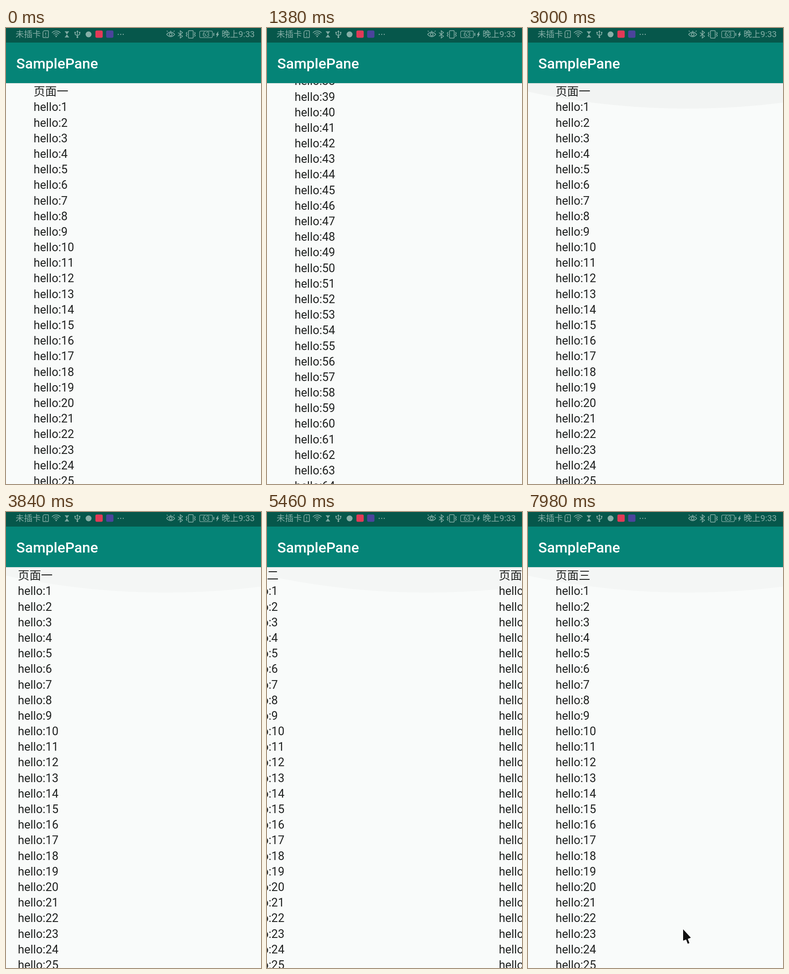
An HTML page with a canvas that plays this animation: 559x1001 px, repeating every 8000 ms.

```html
<!DOCTYPE html>
<html lang="zh">
<head>
<meta charset="utf-8">
<title>Scrolling pages</title>
<style>
html, body { margin: 0; width: 100%; height: 100%; overflow: hidden; background: #f9fbfa; }
body { position: relative; font-family: Roboto, "Noto Sans CJK SC", "Noto Sans CJK", sans-serif; }
#view { position: absolute; left: 0; top: 121px; width: 559px; height: 880px; overflow: hidden; }
.page { position: absolute; left: 60.4px; top: 1.2px; color: #202221; font-size: 25.4px; white-space: nowrap; }
.page div { height: 34.2px; line-height: 34.2px; }
canvas { position: absolute; left: 0; top: 0; width: 559px; height: 1001px; }
.label { position: absolute; white-space: nowrap; color: #86afa7; font-size: 18.5px; line-height: 28px; top: 0; }
#title { left: 22.5px; top: 58px; color: #fff; font-size: 31.8px; line-height: 40px; font-weight: 500; }
#level { left: 424px; width: 29px; font-size: 14px; text-align: center; }
</style>
</head>
<body>
<div id="view"></div>
<canvas id="art"></canvas>
<div class="label" style="left:21px">未插卡</div>
<div class="label" id="level">63</div>
<div class="label" style="left:472.5px">晚上9:33</div>
<div class="label" id="title">SamplePane</div>
<script>
const W = 559, H = 1001, BAR = 121, STATUS = 32, LOOP = 8000, STEP = 60;
const ICON = '#86afa7';
const SCROLL = 1322;   // how far the first list is flung
const GAP = 8.5;       // the second page stops short by this much

// Progress from 0 to 1 with a cubic ease at both ends.
function ease(t, start, length) {
  const p = Math.min(1, Math.max(0, (t - start) / length));
  return p < 0.5 ? 4 * p ** 3 : 1 - 4 * (1 - p) ** 3;
}

const scrollY = t => SCROLL * (ease(t, 360, 960) - ease(t, 1575, 720));
const scrollX = t => (W - GAP) * ease(t, 3720, 480) + (W + GAP) * ease(t, 5280, 480);

const view = document.getElementById('view');
const pages = ['一', '二', '三'].map(name => {
  const page = document.createElement('div');
  page.className = 'page';
  for (let i = 0; i < 100; i++) {
    const row = document.createElement('div');
    row.textContent = i ? 'hello:' + i : '页面' + name;
    page.append(row);
  }
  view.append(page);
  return page;
});

const canvas = document.getElementById('art');
const dpr = window.devicePixelRatio || 1;
canvas.width = W * dpr;
canvas.height = H * dpr;
const c = canvas.getContext('2d');
c.scale(dpr, dpr);

function rect(x, y, w, h, color) {
  c.fillStyle = color;
  c.fillRect(x, y, w, h);
}

function box(x, y, w, h, r, fill) {
  c.beginPath();
  c.roundRect(x, y, w, h, r);
  if (fill) { c.fillStyle = fill; c.fill(); } else c.stroke();
}

function line(points, fill) {
  c.beginPath();
  for (let i = 0; i < points.length; i += 2) c.lineTo(points[i], points[i + 1]);
  if (fill) { c.closePath(); c.fillStyle = fill; c.fill(); } else c.stroke();
}

function disc(x, y, r, color = ICON) {
  c.beginPath();
  c.arc(x, y, r, 0, 7);
  c.fillStyle = color;
  c.fill();
}

// Runs a drawing around a centre on the status bar's middle line.
function icon(x, paint) {
  c.save();
  c.translate(x, 14);
  c.strokeStyle = ICON;
  c.lineWidth = 1.5;
  paint();
  c.restore();
}

const sides = paint => [-1, 1].forEach(paint);

function sim() {
  box(-6, -8, 12, 15, [4, 1, 1, 1]);
  line([0, -4, 0, 1]);
  disc(0, 4, 1);
}

function wifi() {
  for (let r = 4.5; r < 13; r += 4) {
    c.beginPath();
    c.arc(0, 5, r, -Math.PI * 0.77, -Math.PI * 0.23);
    c.stroke();
  }
  disc(0, 4.5, 1.6);
}

function hourglass() {
  sides(s => {
    line([-4.5, 6 * s, 4.5, 6 * s]);
    line([-3.5, 5 * s, 3.5, 5 * s, 0, 0], ICON);
  });
}

function usb() {
  line([0, -6, 0, 6]);
  line([-5, -3, -5, 0, 0, 3, 5, 0, 5, -3]);
  line([-2.5, -5, 0, -9, 2.5, -5], ICON);
  disc(0, 6, 1.9);
  sides(s => disc(5 * s, -4, 1.7));
}

function eye() {
  c.beginPath();
  sides(s => {
    c.moveTo(-9, 0);
    c.quadraticCurveTo(0, 10 * s, 9, 0);
    line.call;
  });
  c.stroke();
  c.beginPath();
  c.arc(0, 0, 3, 0, 7);
  c.stroke();
  for (let k = -1; k <= 1; k++) line([6.5 * k, -6, 8.5 * k, -8]);
}

function bluetooth() {
  line([-5, -4, 5, 4, 0, 8, 0, -8, 5, -4, -5, 4]);
}

function vibration() {
  box(-5, -8.2, 10.4, 16.4, 1.5);
  sides(s => {
    const zigzag = [];
    for (let k = 0; k < 5; k++) zigzag.push(s * (8 + k % 2 * 2), -5 + 2.5 * k);
    line(zigzag);
  });
}

function battery() {
  c.lineWidth = 1.2;
  box(-14, -7.3, 28, 14.5, 2.5);
  rect(16, -3.2, 2, 6.4, ICON);
}

function bolt() {
  sides(s => line([2 * s, -7 * s, -3.5 * s, s, s, s], ICON));
}

function drawBars() {
  rect(0, STATUS, W, BAR - STATUS, '#058477');
  rect(0, 0, W, STATUS, '#06574b');
  rect(0, BAR, W, 2, 'rgba(0,0,0,.05)');
  icon(87, sim);
  icon(110, wifi);
  icon(133.5, hourglass);
  icon(156.5, usb);
  disc(181, 14, 6.5);
  box(196, 5.5, 16, 16, 3, '#e23a57');
  box(219.5, 5.5, 16, 16, 3, '#4b449c');
  for (let k = 0; k < 3; k++) disc(246 + 5.5 * k, 14, 1.2);
  icon(361, eye);
  icon(382, bluetooth);
  icon(405, vibration);
  icon(438.5, battery);
  icon(463.5, bolt);
}

function drawGlow(t) {
  const radius = 1667, depth = 56 * ease(t, 2280, 360);
  const alpha = 0.055 * ease(t, 2280, 300) - 0.035 * ease(t, 2640, 600);
  disc(350, BAR + depth - radius, radius, `rgba(0,0,0,${alpha})`);
  c.clearRect(0, 0, W, BAR);
}

function drawPointer(t) {
  const p = ease(t, 7080, 480);
  if (!p) return;
  c.save();
  c.translate(340 - 18 * (1 - p), 916 + 90 * (1 - p));
  c.lineJoin = 'round';
  const head = [0, 0, 0, 25, 17, 18.5, 0, 0], tail = [7, 18, 12, 31];
  c.strokeStyle = '#fff';
  c.lineWidth = 3;
  line(head);
  c.lineWidth = 7;
  line(tail);
  c.strokeStyle = '#111';
  c.lineWidth = 4;
  line(tail);
  line(head, '#111');
  c.restore();
}

function draw(now) {
  const t = Math.floor((now % LOOP) / STEP) * STEP;
  const x = scrollX(t), y = scrollY(t);
  pages.forEach((page, i) => {
    page.style.transform = `translate(${i * W - x}px, ${i ? 0 : -y}px)`;
  });
  c.clearRect(0, 0, W, H);
  drawGlow(t);
  drawBars();
  drawPointer(t);
}

const start = performance.now();
function tick() {
  draw(performance.now() - start);
  requestAnimationFrame(tick);
}
tick();
</script>
</body>
</html>
```
